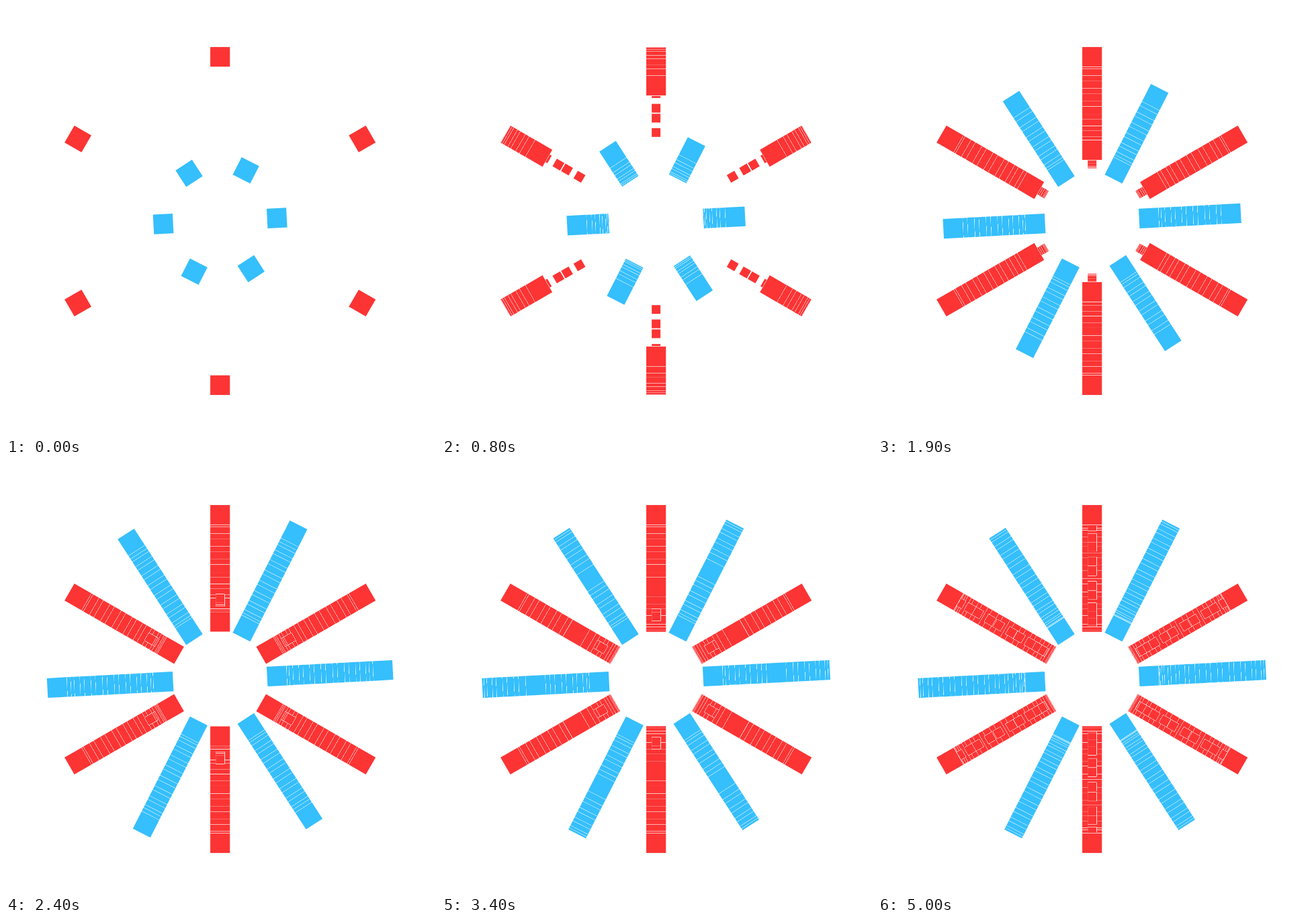
These frames come from a looping animation (640x640 px, 5.1 s). An HTML page with a canvas:

```html
<!DOCTYPE html>
<html lang="en">
<head>
<meta charset="utf-8">
<title>Squares</title>
<style>
  html, body { margin: 0; width: 100%; height: 100%; overflow: hidden; background: #fff; }
  canvas { display: block; width: 640px; height: 640px; }
</style>
</head>
<body>
<canvas id="stage" width="640" height="640"></canvas>
<script>
const ctx = document.getElementById('stage').getContext('2d');
const RED = '#fc3434', BLUE = '#35bffc', WHITE = '#fff';
const CX = 318.65, CY = 320;
const NEAR = 84.7, FAR = 244.3;
const BIG = 29.2, SMALL = 13;
const STEP = 100, STEPS = 51;
const REPAINT = 10; // step at which the resting squares are stamped again

// Cubic timing curve with flat ends and handles at x = a and x = b.
function ease(x, a, b) {
  let lo = 0, hi = 1;
  for (let i = 0; i < 24; i++) {
    const s = (lo + hi) / 2, r = 1 - s;
    if (3 * a * s * r * r + 3 * b * s * s * r + s * s * s < x) lo = s; else hi = s;
  }
  return lo * lo * (3 - 2 * lo);
}

// Keys: [time, value, a, b]; the handles shape the way to the next key.
const bigTrack = [[0, 0, .31, .635], [2480, 1, .33, .63], [4960, 0]];
const blueTrack = [[0, 0, .33, .83], [2480, 1, .17, .67], [4960, 0]];
const smallTrack = [
  [0, 0, .3, .7], [1236, 1, .33, .67], [2520, .775, .33, .67],
  [3804, 1, .3, .7], [5040, 0]
];

function valueAt(track, t) {
  for (let i = 1; i < track.length; i++) {
    const [t0, v0, a, b] = track[i - 1], [t1, v1] = track[i];
    if (t < t1) return v0 + (v1 - v0) * ease((t - t0) / (t1 - t0), a, b);
  }
  return track[track.length - 1][1];
}

// Six squares around the centre, filled a number of times.
function fillRing({ offset, radius, size, color }, fill, times) {
  ctx.fillStyle = fill || color;
  for (let k = 0; k < 6; k++) {
    ctx.save();
    ctx.translate(CX, CY);
    ctx.rotate(-(offset + 60 * k) * Math.PI / 180);
    for (let i = 0; i < times; i++) ctx.fillRect(radius - size / 2, -size / 2, size, size);
    ctx.restore();
  }
}

const redRing = (p, size) => ({ offset: 30, radius: FAR - (FAR - NEAR) * p, size, color: RED });
const blueRing = p => ({ offset: 3, radius: NEAR + (FAR - NEAR) * p, size: BIG, color: BLUE });

// Soft edge pixels blend with white, not with older squares:
// a solid white footprint goes down first, then the colour.
function paint(rings) {
  for (const ring of rings) fillRing(ring, WHITE, 20);
  for (const ring of rings) fillRing(ring, null, 1);
}

function stamp(n) {
  const t = 40 * Math.floor(n * 2.5); // motion runs on a 25 fps grid
  if (n === REPAINT) paint([redRing(0, BIG), blueRing(0)]);
  paint([
    redRing(valueAt(smallTrack, t), SMALL),
    redRing(valueAt(bigTrack, t), BIG),
    blueRing(valueAt(blueTrack, t))
  ]);
}

// Squares are never wiped within a loop; only the missing steps are added.
let shown = STEPS;
function draw(last) {
  if (last < shown) {
    ctx.fillStyle = WHITE;
    ctx.fillRect(0, 0, 640, 640);
    shown = -1;
  }
  while (shown < last) stamp(++shown);
}

const start = performance.now();
function tick() {
  draw(Math.floor(Math.max(0, performance.now() - start) / STEP) % STEPS);
  requestAnimationFrame(tick);
}
tick();
</script>
</body>
</html>
```
